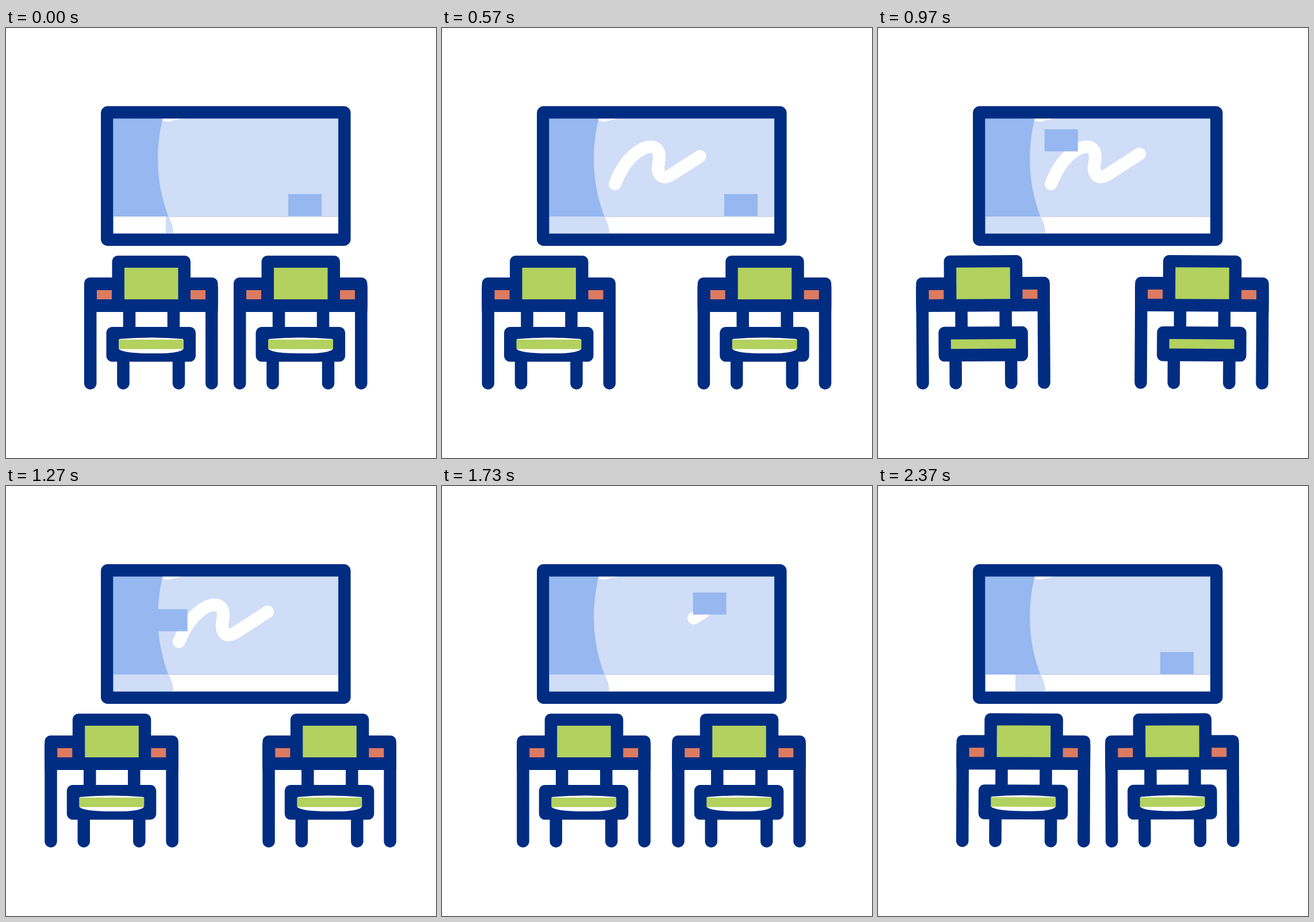
An HTML page that plays this animation: 748x748 px, repeating every 2410 ms.

```html
<!DOCTYPE html>
<html lang="en">
<head>
<meta charset="utf-8">
<title>Classroom</title>
<style>
  html, body { margin: 0; width: 100%; height: 100%; overflow: hidden; background: #fff; }
  svg { display: block; width: 100%; height: 100%; }
  .navy { fill: #002d82; }
  .blue { fill: #96b7f0; }
  .light { fill: #d0ddf7; }
  .green { fill: #b2d15e; }
  .orange { fill: #dc7b60; }
  .line { fill: none; stroke: #002d82; stroke-width: 21.5; stroke-linecap: round; }
</style>
</head>
<body>
<svg viewBox="0 0 748 748">
  <defs>
    <g id="desk">
      <path class="line" d="M146.7 450V618M357.8 450V618M204 570V618M300.5 570V618M214.5 490V525M291.5 490V525"/>
      <rect class="navy" x="136" y="434" width="232.5" height="60" rx="10"/>
      <path class="navy" d="M136 450H157.4V494H136ZM347 450H368.5V494H347Z"/>
      <rect class="navy" x="184.5" y="396" width="136.5" height="90" rx="10"/>
      <rect class="navy" x="174.5" y="520" width="155.5" height="60.5" rx="10"/>
      <rect class="green" x="206" y="417" width="93.5" height="55"/>
      <path class="orange" d="M158 456H184V472H158ZM321 456H347V472H321Z"/>
    </g>
    <path id="gap" fill="#fff" d="M197 541Q252 536 308 541V559Q300 567 252 566Q206 566 197 559Z"/>
    <rect id="seat" class="green" x="196" y="542" width="113" height="16.5"/>
    <clipPath id="reveal"><rect id="window" y="328" width="300" height="30"/></clipPath>
  </defs>

  <path class="light" d="M187 157H578V328H187Z"/>
  <path class="blue" d="M187 157H272.5C260 212 260 268 282.5 328H187Z"/>
  <path fill="#fff" d="M273 157H308L282 163L272 161Z"/>
  <path class="light" clip-path="url(#reveal)" d="M187 328H283Q291 343 291 357H187Z"/>
  <path fill="none" stroke="#b9c7e2" d="M283 328H578"/>
  <path id="chalk" pathLength="1" fill="none" stroke="#fff" stroke-width="22" stroke-linecap="round" stroke-linejoin="round"
    d="M301 271C312 243 328 221 349 210C368 202 378 209 378 225C378 235 372 247 380 256C386 262 394 259 404 252L455 219"/>
  <rect id="eraser" class="blue" x="-29" y="-19.2" width="58" height="38.4"/>
  <rect class="line" x="175.8" y="146.8" width="413" height="221.4" rx="1" stroke-linejoin="round"/>

  <g id="left"><use href="#desk"/><use class="gap" href="#gap"/><use href="#seat"/></g>
  <g id="right"><use href="#desk"/><use class="gap" href="#gap"/><use href="#seat"/></g>
</svg>
<script>
const LOOP = 2410;
const OUT = 207, OUT_END = 618, BACK = 1397, BACK_END = 1808;
const $ = id => document.getElementById(id);
const progress = (t, from, to) => Math.min(1, Math.max(0, (t - from) / (to - from)));
const ease = (t, from, to) => (1 - Math.cos(Math.PI * progress(t, from, to))) / 2;

// Interpolates rows of [time, ...values].
function track(rows, t, timing) {
  let i = 1;
  while (i < rows.length - 1 && t > rows[i][0]) i++;
  const [from, ...a] = rows[i - 1], [to, ...b] = rows[i];
  const k = timing(t, from, to);
  return a.map((v, j) => v + (b[j] - v) * k);
}

// Braking desk rocks up on its leading foot, then bounces once.
function rock(age) {
  const hump = 300;
  if (age < 0 || age > 2 * hump) return 0;
  return (age < hump ? 2 : 0.6) * Math.abs(Math.sin(Math.PI * age / hump));
}

function placeDesk(id, home, travel, t) {
  const returning = t >= BACK;
  const shift = travel * (ease(t, OUT, OUT_END) - ease(t, BACK, BACK_END));
  const heading = Math.sign(travel) * (returning ? -1 : 1);
  const tilt = rock(t - (returning ? BACK_END : OUT_END));
  const foot = heading > 0 ? 358 : 146.5;
  const desk = $(id);
  desk.setAttribute('transform', `translate(${home + shift} 0) rotate(${heading * tilt} ${foot} 628)`);
  desk.querySelector('.gap').style.display = tilt < 0.25 ? '' : 'none';
}

const eraserPath = [
  [OUT_END, 520, 308], [1085, 286, 177], [BACK, 287, 264],
  [BACK_END, 482, 199], [2219, 520, 308]
];
const shinePath = [[0, 278], [370, 220], [570, 187], [1700, 187], [1970, 192], [2370, 238], [LOOP, 278]];

function draw(t) {
  placeDesk('left', 0, -68.7, t);
  placeDesk('right', 260, 50.3, t);

  const start = ease(t, BACK, BACK_END);
  const length = ease(t, OUT, OUT_END) - start;
  const chalk = $('chalk').style;
  chalk.display = length > 0.001 ? '' : 'none';
  chalk.strokeDasharray = `${length} 2`;
  chalk.strokeDashoffset = -start;

  $('eraser').setAttribute('transform', `translate(${track(eraserPath, t, ease)})`);
  $('window').setAttribute('x', track(shinePath, t, progress)[0]);
}

const begin = performance.now();
function tick() {
  draw((performance.now() - begin) % LOOP);
  requestAnimationFrame(tick);
}
tick();
</script>
</body>
</html>
```
